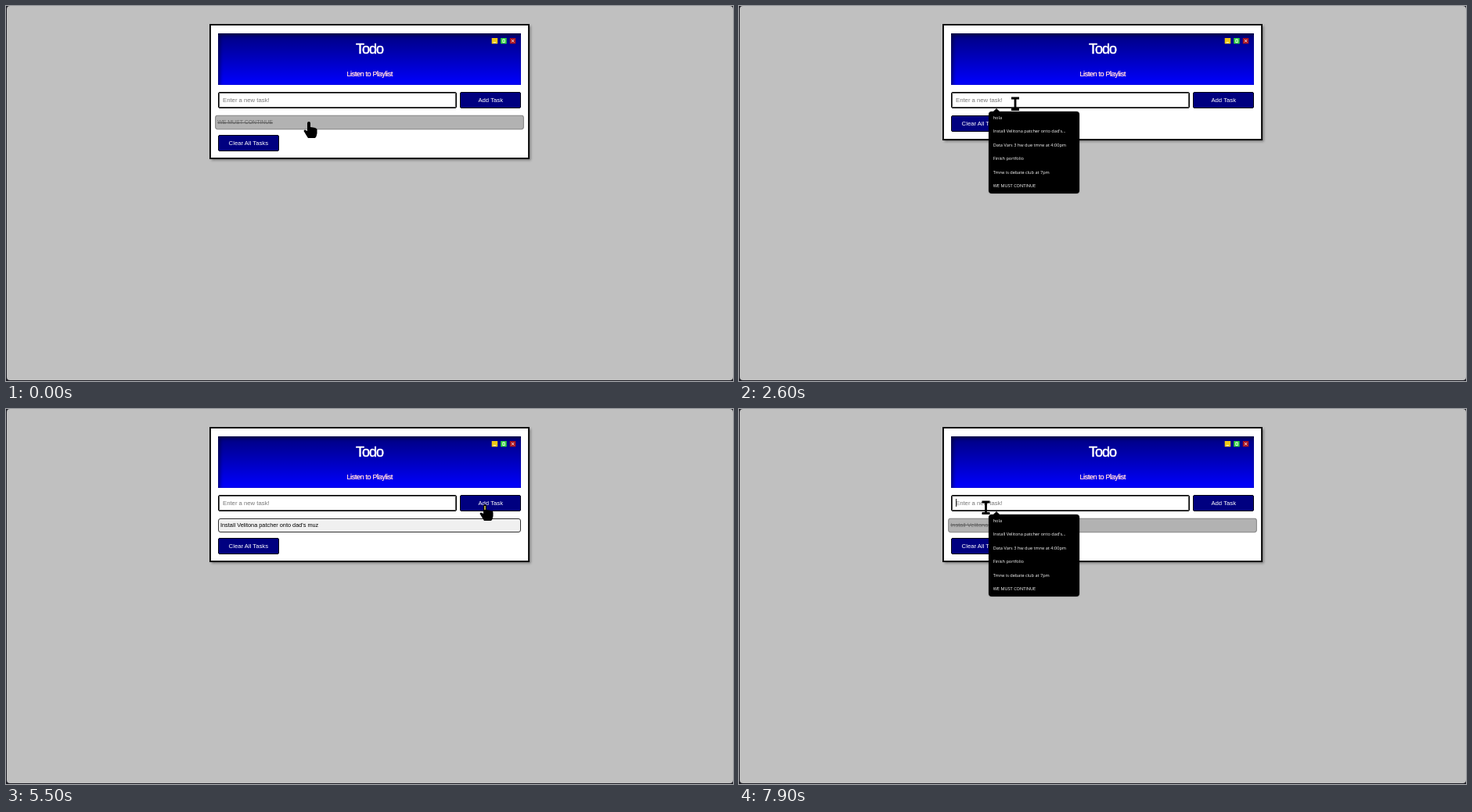
These frames come from a looping animation (929 by 480 pixels, 8 s). An HTML page:

```html
<!DOCTYPE html>
<html lang="en">
<head>
<meta charset="utf-8">
<title>Todo</title>
<style>
html, body { margin: 0; width: 100%; height: 100%; overflow: hidden; background: #1c1c24; }
body, div, svg { box-sizing: border-box; }
div, svg { position: absolute; white-space: nowrap; }
svg { left: 0; top: 0; }
#stage { left: 0; top: 0; width: 929px; height: 480px; font: 7.73px "Liberation Sans", Arial, sans-serif; overflow: hidden; }
#desk { left: 1px; top: 0; width: 927.5px; height: 479px; border-radius: 4px; background: #c0c0c0; }
#card { left: 260px; top: 23px; width: 409px; background: #fff; border: 1px solid #000; box-shadow: inset 0 0 0 1px #222, 1.5px 1.5px 3px #0006; }
#head { left: 271px; top: 34.5px; width: 387px; height: 66px; background: linear-gradient(#000080, #00f); box-shadow: inset 2px 2px 5px #0009; color: #fff; text-align: center; }
#title { left: 0; top: 8.5px; width: 100%; font-size: 18px; line-height: 24px; letter-spacing: -1px; -webkit-text-stroke: .5px #fff; }
#link { left: 0; top: 46px; width: 100%; font-size: 9px; line-height: 12px; letter-spacing: -.36px; color: #ffd3e0; text-shadow: .4px 0 #ffd3e0; }
.box { display: flex; align-items: center; height: 20.7px; border-radius: 2px; }
.button { width: 77.7px; justify-content: center; border: 1px solid #000010; background: #000080; color: #fff; }
#input { left: 271px; top: 110px; width: 305px; padding-left: 5px; border: 1px solid #000; box-shadow: inset 0 0 0 1px #555; }
#item { left: 271px; top: 140px; width: 387px; height: 17.5px; padding-left: 2px; border: 1px solid #333; border-radius: 3px; color: #000; }
#menu { left: 319px; top: 135px; width: 116px; height: 105px; border-radius: 4px; background: #000; color: #fff; font: 5.6px/17.4px "Open Sans", sans-serif; box-shadow: 0 0 2px #0006; }
#menu div { left: 0; width: 100%; padding-left: 5.7px; height: 17.4px; }
#menu svg { left: 5px; top: -4px; }
#caret { left: 277px; top: 115px; width: 1px; height: 10px; background: #222; }
</style>
</head>
<body>
<div id="stage">
  <div id="desk"></div>
  <div id="card"></div>
  <div id="head"><div id="title">Todo</div><div id="link">Listen to Playlist</div></div>
  <svg width="929" height="480" fill="none" stroke="#fff" stroke-width=".9">
    <g stroke="none">
      <rect x="620.7" y="41" width="7.5" height="7.3" fill="#f0c814"/>
      <rect x="632.2" y="41" width="7.5" height="7.3" fill="#32d23c"/>
      <rect x="643.8" y="41" width="7.5" height="7.3" fill="#a81420"/>
    </g>
    <path d="M622.7 46.7h3.3M634.8 42.8h2.4v3.8h-2.4zM646 43l3.2 3.4m0-3.4l-3.2 3.4"/>
  </svg>
  <div id="input" class="box"></div>
  <div id="caret"></div>
  <svg id="handles" width="929" height="480" fill="#b04cd0">
    <path d="M407 112.5Q410 110 413 112.5Q413 115 410 116.5Q407 115 407 112.5ZM410 122.5Q413 124 413 127Q410 129 407 127Q407 124 410 122.5Z"/>
  </svg>
  <div class="box button" style="left:580.4px;top:110px">Add Task</div>
  <div id="item" class="box"></div>
  <div id="clear" class="box button" style="left:271px">Clear All Tasks</div>
  <div id="menu"><svg width="10" height="5"><path d="M0 5L5 0L10 5Z"/></svg></div>
  <svg width="929" height="480">
    <g id="cursor">
      <g id="arrow"><path d="M0 0L12 11L7 12L10 17L7 18.5L4 13.5L0 17Z"/><path class="glow" d="M1.5 3L7.5 9L1.5 11Z" fill="#f2e66a"/></g>
      <g id="hand"><path d="M-2 1Q-2-1 0-1Q2-1 2 1V6Q10 6.5 10.5 9V14Q10 18 8 20H-1Q-3 17-6.5 11Q-6 8-2 11Z"/><path class="glow" d="M-.7 1h1.4v5h-1.4z" fill="#f2e66a"/></g>
      <path id="beam" d="M-5-7H5M0-7V7.5M-5 7.5H5" stroke="#000" stroke-width="2.8"/>
    </g>
  </svg>
</div>
<script>
const $ = id => document.getElementById(id);
const LOOP = 8000, STEP = 100;
const CLEARED = 1400, FILLED = 2800, ADDED = 5100, DONE = 6800;
const TASK = "Install Velitona patcher onto dad's muz";
const OLD_TASK = "WE MUST CONTINUE";

// Pointer stops: time, x, y
const path = [
  [0, 387, 149], [500, 387, 149], [900, 335, 170], [1100, 314, 176], [1400, 314, 176],
  [1900, 353, 125], [2600, 353, 125], [2800, 353, 158], [3000, 353, 144], [3500, 353, 125],
  [4500, 353, 125], [5000, 612, 123], [5700, 612, 123], [6300, 420, 160], [6700, 325, 141],
  [7400, 325, 141], [7700, 315.5, 126], [8000, 315.5, 126]
];

[ "hola", TASK.slice(0, -4) + "...", "Data Vars 3 hw due tmrw at 4:00pm", "Finish portfolio",
  "Tmrw is debate club at 7pm", OLD_TASK ].forEach((text, i) => {
  const row = document.createElement("div");
  row.id = "row" + i;
  row.textContent = text;
  row.style.top = i * 17.4 + "px";
  $("menu").append(row);
});

const ramp = (t, from, to) => Math.min(1, Math.max(0, (t - from) / (to - from)));
const mix = (a, b, p) => a + (b - a) * p;
const between = (t, from, to) => t >= from && t < to;
const show = (el, on) => el.style.display = on ? "" : "none";

function pointerAt(t) {
  const i = path.findIndex(p => p[0] > t);
  const [t0, x0, y0] = path[i - 1], [t1, x1, y1] = path[i];
  const p = ramp(t, t0, t1), ease = p * p * (3 - 2 * p);
  return [mix(x0, x1, ease), mix(y0, y1, ease)];
}

function drawCursor(t, tall) {
  const [x, y] = pointerAt(t);
  const inBar = between(y, 110, 131);
  const onAdd = inBar && between(x, 580, 658);
  const onItem = tall && between(y, 140, 157.5);
  const kind = inBar && between(x, 271, 576) ? "beam" : onAdd || onItem ? "hand" : "arrow";
  const onClear = tall && between(x, 271, 348.5) && between(y, 165, 185.7);
  for (const id of ["arrow", "hand", "beam"]) show($(id), id === kind);
  document.querySelectorAll(".glow").forEach(el => show(el, onAdd || onClear));
  $("cursor").setAttribute("transform", `translate(${x} ${y})`);
}

function drawItem(t, tall) {
  const first = t < CLEARED;
  const hover = first ? 1 : ramp(t, 6650, 6900);
  const fade = first ? 1 : ramp(t, 6840, 7240);
  const grey = mix(240, 128, hover);
  const el = $("item");
  show(el, tall);
  el.textContent = first ? OLD_TASK : TASK;
  Object.assign(el.style, {
    fontSize: first ? "6.8px" : "7.33px",
    transform: `scale(${mix(1, 1.02, hover)})`,
    opacity: mix(1, .6, fade),
    background: `rgb(${grey},${grey},${grey})`,
    textDecoration: first || t >= DONE ? "line-through" : "none"
  });
}

function draw(t) {
  const tall = t < CLEARED || t >= ADDED;
  $("card").style.height = (tall ? 173 : 148.5) + "px";
  drawItem(t, tall);

  const glow = ramp(t, 900, 1100) - ramp(t, 1400, 1600);
  $("clear").style.top = (tall ? 165 : 140.3) + "px";
  $("clear").style.background = `rgb(0,0,${mix(128, 225, glow)})`;

  const filled = between(t, FILLED, ADDED);
  $("input").textContent = filled ? TASK : "Enter a new task!";
  $("input").style.color = filled ? "#222" : "#757575";
  $("input").style.background = filled ? "#e8f0fe" : "#fff";
  show($("handles"), between(t, 3000, 4900));
  show($("caret"), between(t, 2000, 2500) || t >= 7800);

  show($("menu"), between(t, 2100, 3000) || t >= 7800);
  $("row1").style.background = between(t, FILLED, 3000) ? "#333" : "none";
  drawCursor(t, tall);
}

function frame(now) {
  draw(Math.floor(now % LOOP / STEP) * STEP);
  requestAnimationFrame(frame);
}
draw(0);
requestAnimationFrame(frame);
</script>
</body>
</html>
```
